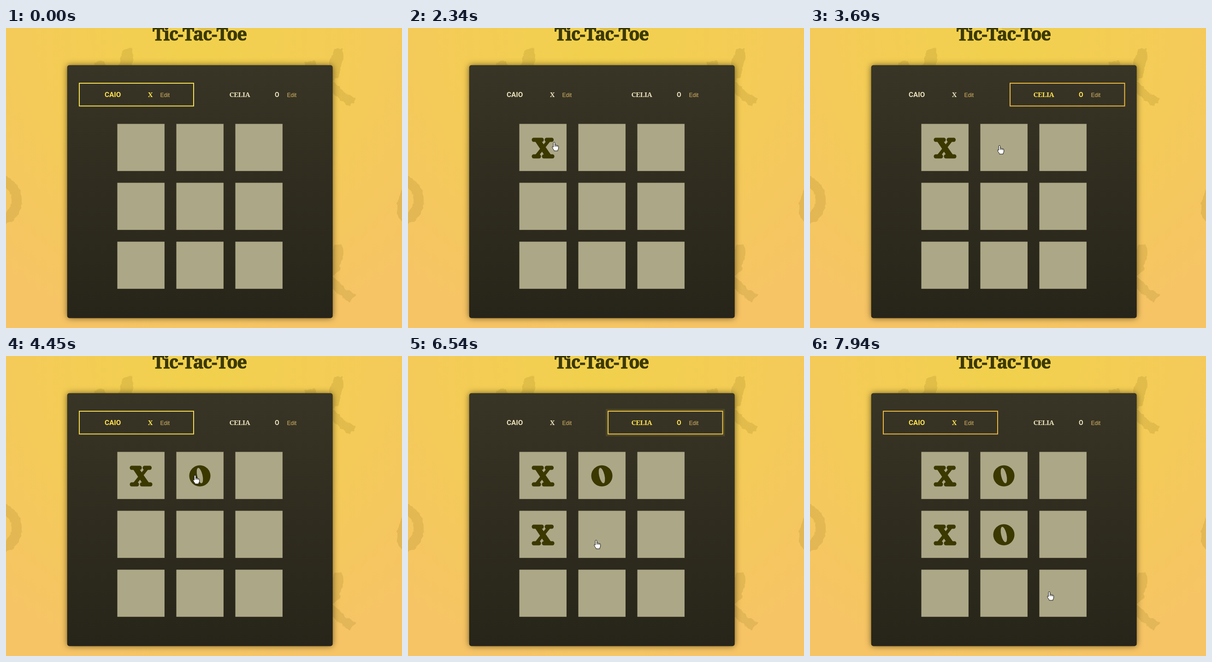
These frames come from a looping animation (859x652 px, 8 s). An HTML page:

```html
<!DOCTYPE html>
<html lang="en">
<head>
<meta charset="utf-8">
<title>Tic-Tac-Toe</title>
<style>
  html, body { margin: 0; width: 100%; height: 100%; overflow: hidden; background: #f5c95a; }
  svg { display: block; width: 859px; height: 652px; }
  .title { font: 900 38px "Noto Serif", serif; letter-spacing: -1.2px; fill: #3b3800; stroke: #3b3800; stroke-width: 1.1px; }
  .brush { fill: #967a20; opacity: .19; }
  .board { filter: drop-shadow(0 0 7px rgba(30, 25, 0, .6)); }
  .cell { fill: #aca786; }
  .mark { fill: #3b3800; visibility: hidden; }
  .sans { font: 700 15.3px Roboto, sans-serif; }
  .slab { font: 700 15px "Noto Serif", serif; letter-spacing: -.4px; }
  .sign { font-size: 14px; letter-spacing: 0; }
  .edit { font: 12px "Liberation Sans", Arial, sans-serif; fill: #d9b565; }
  .player { fill: #e9dfba; }
  .player.on { fill: #ffe14f; }
  .frame, .ring { fill: none; visibility: hidden; }
  .frame { stroke-width: 2; }
  .on .frame, .on .ring { visibility: visible; }
  .cursor { fill: #fff; stroke: #111; stroke-width: 1; stroke-linejoin: round; }
</style>
</head>
<body>
<svg viewBox="0 0 859 652" xmlns="http://www.w3.org/2000/svg">
  <defs>
    <radialGradient id="sky" gradientUnits="userSpaceOnUse" cx="420" cy="0" r="680">
      <stop offset="0" stop-color="#f1d14c"/>
      <stop offset=".55" stop-color="#f4cb58"/>
      <stop offset="1" stop-color="#f6c465"/>
    </radialGradient>
    <linearGradient id="slate" x2="0" y2="1">
      <stop offset="0" stop-color="#383526"/>
      <stop offset="1" stop-color="#272419"/>
    </linearGradient>
    <filter id="rough" filterUnits="userSpaceOnUse" x="-80" y="-30" width="1040" height="710">
      <feTurbulence type="fractalNoise" baseFrequency=".09" numOctaves="2" seed="4"/>
      <feDisplacementMap in="SourceGraphic" scale="9" xChannelSelector="R" yChannelSelector="G"/>
    </filter>
    <g id="cross">
      <path d="M712 46L730 43 732 62 727 84 722 104 709 113 690 113 700 84ZM700 108L716 120 732 138 759 154 745 171 728 158 709 142Z"/>
      <path d="M648 74L668 72 690 100 650 100Z"/>
    </g>
    <ellipse id="loop" rx="38" ry="44" fill="none" stroke="#967a20" stroke-width="22"/>
    <g id="X">
      <path d="M33 36L47 36 70 69 55 69Z"/>
      <path d="M61 34L67 38 40 72 33 69Z"/>
      <rect x="27" y="30" width="26" height="9" rx="4.2"/>
      <rect x="55" y="30" width="19.500" height="9" rx="4.200"/>
      <rect x="27" y="66" width="20" height="9" rx="4.200"/>
      <rect x="49" y="66" width="27" height="9" rx="4.200"/>
    </g>
    <g id="O">
      <circle cx="51" cy="52" r="23"/>
      <ellipse cx="51" cy="51.500" rx="5.800" ry="17" transform="rotate(-13 51 51.500)" fill="#aca786"/>
    </g>
  </defs>

  <rect width="859" height="652" fill="url(#sky)"/>
  <g class="brush" filter="url(#rough)">
    <use href="#cross"/>
    <use href="#cross" x="-456"/>
    <use href="#cross" y="426"/>
    <use href="#loop" x="-15" y="374"/>
    <use href="#loop" x="897" y="387"/>
    <ellipse cx="438" cy="-2" rx="23" ry="8"/>
  </g>

  <text class="title" x="420" y="26.500" text-anchor="middle">Tic-Tac-Toe</text>
  <rect class="board" x="132.700" y="80.800" width="576" height="549.600" rx="5" fill="url(#slate)"/>

  <g class="player">
    <rect class="ring"/>
    <rect class="frame" x="159" y="120" width="248" height="49.500"/>
    <text class="sans" x="214" y="150">CAIO</text>
    <text class="slab sign" x="308" y="150">X</text>
    <text class="edit" x="334.500" y="150.300">Edit</text>
  </g>
  <g class="player">
    <rect class="ring"/>
    <rect class="frame" x="434" y="120" width="248.500" height="49.500"/>
    <text class="slab" x="484.500" y="150">CELIA</text>
    <text class="sans sign" x="583" y="150">O</text>
    <text class="edit" x="609.500" y="150.300">Edit</text>
  </g>

  <g id="grid"></g>

  <g id="pointer" class="cursor">
    <path id="hand" d="M-1.700 1.600Q-1.700 .3 0 .3T1.700 1.600V6.300Q3.200 5.300 4.300 7Q6 6.200 7 7.900Q9.600 7.300 9.600 9.700V13Q9.400 15.500 8 17V19H-.2V17.600Q-2.600 14.800-4 11.700Q-4.600 9.800-3 9.600L-1.700 11Z M4.300 7V10M7 8V10.500M1.700 6.300V10"/>
    <path id="arrow" d="M0 0V13.500L3.100 10.700 5.300 15.500 7.300 14.600 5.200 9.900H9.500Z"/>
  </g>
</svg>
<script>
  const LOOP = 8000, PULSE = 1000;
  const LEFT = 241.500, TOP = 208.400, SIZE = 102.400, STEP = 128;
  const YELLOW = [250, 224, 78], ORANGE = [238, 184, 60];

  // time of click, cell, sign
  const moves = [[2340, 0, 'X'], [4040, 1, 'O'], [5770, 3, 'X'], [6680, 4, 'O']];
  // player, highlight start, pulse start, highlight end
  const turns = [
    [0, 0, 180, 2340], [1, 2430, 2430, 4040], [0, 4200, 4200, 5770],
    [1, 5880, 5880, 6680], [0, 6790, 6830, LOOP]
  ];
  // time, x, y of the pointer tip
  const path = [
    [760, 812, 670], [830, 797, 636], [960, 655, 455], [1080, 530, 325],
    [1160, 482, 281], [1510, 422, 268], [1990, 343, 249], [2200, 317, 248],
    [2640, 317, 248], [2940, 363, 251], [3350, 395, 253], [3690, 411, 255],
    [4300, 411, 255], [4500, 410, 260], [4780, 376, 322], [4990, 344, 378],
    [5350, 302, 381], [6060, 302, 381], [6300, 358, 392], [6540, 408, 400],
    [7060, 408, 400], [7400, 415, 414], [7730, 433, 436], [7800, 441, 444],
    [7940, 519, 512]
  ];

  const $ = id => document.getElementById(id);
  const make = (tag, attrs, parent) => {
    const el = document.createElementNS('http://www.w3.org/2000/svg', tag);
    for (const k in attrs) el.setAttribute(k, attrs[k]);
    return parent.appendChild(el);
  };
  const show = (el, on) => el.style.visibility = on ? 'visible' : 'hidden';
  const cellX = i => LEFT + i % 3 * STEP;
  const cellY = i => TOP + Math.floor(i / 3) * STEP;

  for (let i = 0; i < 9; i++)
    make('rect', { class: 'cell', x: cellX(i), y: cellY(i), width: SIZE, height: SIZE }, $('grid'));
  const marks = moves.map(([, i, sign]) =>
    make('use', { class: 'mark', href: '#' + sign, x: cellX(i), y: cellY(i) }, $('grid')));

  const players = [...document.querySelectorAll('.player')].map(el => ({
    el, ring: el.querySelector('.ring'), frame: el.querySelector('.frame')
  }));

  function drawPlayer(index, t) {
    const { el, ring, frame } = players[index];
    const turn = turns.find(([p, from, , to]) => p === index && t >= from && t < to);
    el.classList.toggle('on', !!turn);
    if (!turn) return;
    const p = Math.min(1, Math.max(0, (t - turn[2]) / PULSE));
    const e = p * p * (3 - 2 * p);
    const spread = Math.floor(6 * e);
    const rgb = YELLOW.map((c, k) => Math.round(c + (ORANGE[k] - c) * e));
    frame.style.stroke = `rgb(${rgb})`;
    const box = frame.getBBox(), out = 1 + spread / 2;
    ring.setAttribute('x', box.x - out);
    ring.setAttribute('y', box.y - out);
    ring.setAttribute('width', box.width + 2 * out);
    ring.setAttribute('height', box.height + 2 * out);
    ring.style.strokeWidth = spread;
    ring.style.stroke = `rgba(255, 224, 78, ${0.4 * (1 - e)})`;
  }

  function drawPointer(t) {
    const visible = t >= path[0][0];
    const next = path.findIndex(p => p[0] > t);
    const b = path[next < 0 ? path.length - 1 : next];
    const a = next > 0 ? path[next - 1] : b;
    const k = a === b ? 0 : (t - a[0]) / (b[0] - a[0]);
    const x = a[1] + (b[1] - a[1]) * k, y = a[2] + (b[2] - a[2]) * k;
    const inCell = (v, start) => v >= start && v < start + 2 * STEP + SIZE && (v - start) % STEP < SIZE;
    const over = inCell(x, LEFT) && inCell(y, TOP);
    $('pointer').setAttribute('transform', `translate(${Math.round(x)} ${Math.round(y)})`);
    show($('hand'), visible && over);
    show($('arrow'), visible && !over);
  }

  function draw(now) {
    const t = now % LOOP;
    marks.forEach((m, i) => show(m, t >= moves[i][0]));
    drawPlayer(0, t);
    drawPlayer(1, t);
    drawPointer(t);
  }

  let start;
  function tick(now) {
    start ??= now;
    draw(now - start);
    requestAnimationFrame(tick);
  }
  draw(0);
  requestAnimationFrame(tick);
</script>
</body>
</html>
```
